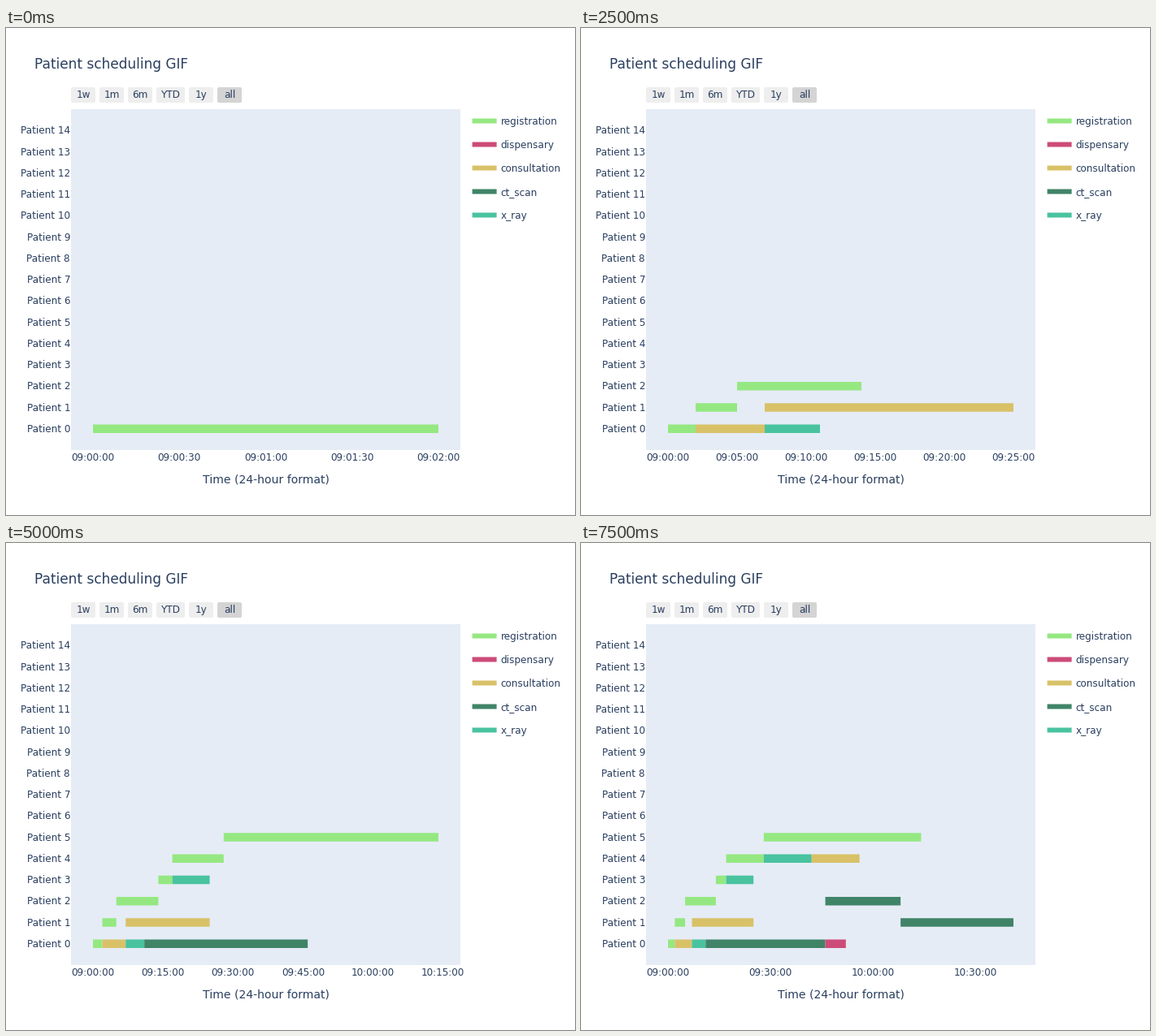
A matplotlib script for the animation above (8000 ms loop, 700 by 600 pixels).

```python
import matplotlib.pyplot as plt
from matplotlib.animation import FuncAnimation
from matplotlib.patches import FancyBboxPatch, Rectangle

W, H, DPI = 700, 600, 100
LEFT, RIGHT, TOP, BOTTOM = 80, 559, 100, 520
X0, X1 = 107, 532          # pixels of the first and last moment
ROW = (BOTTOM - TOP) / 16
INK = "#2a3f5f"

COLORS = {
    "registration": "#95e881",
    "dispensary": "#cd4b78",
    "consultation": "#d9c168",
    "ct_scan": "#408468",
    "x_ray": "#49c39f",
}

# patient, task, start and end in minutes after 09:00, in order of appearance
TASKS = [
    (0, "registration", 0, 2),
    (1, "registration", 2, 5),
    (0, "consultation", 2, 7),
    (2, "registration", 5, 14),
    (1, "consultation", 7, 25),
    (0, "x_ray", 7, 11),
    (0, "ct_scan", 11, 46),
    (3, "registration", 14, 17),
    (4, "registration", 17, 28),
    (3, "x_ray", 17, 25),
    (5, "registration", 28, 74),
    (4, "x_ray", 28, 42),
    (4, "consultation", 42, 56),
    (2, "ct_scan", 46, 68),
    (0, "dispensary", 46, 52),
    (1, "ct_scan", 68, 101),
]
TICK_STEPS = [15, 30, 60, 120, 300, 600, 900, 1800, 3600]

plt.rcParams["font.family"] = "DejaVu Sans"
plt.rcParams["text.hinting"] = "force_autohint"

fig = plt.figure(figsize=(W / DPI, H / DPI), dpi=DPI, facecolor="white")
ax = fig.add_axes([0, 0, 1, 1])
ax.set_xlim(0, W)
ax.set_ylim(H, 0)
ax.axis("off")


def label(x, y, text, size=12, ha="left"):
    return ax.text(x, int(y + 0.5), text, fontsize=size * 72 / DPI, color=INK,
                   ha=ha, va="baseline")


def box(x, y, w, h, color):
    patch = Rectangle((x, y), w, h, facecolor=color, linewidth=0, snap=False)
    return ax.add_patch(patch)


def row_y(patient):
    return BOTTOM - ROW * (patient + 1)


def clock(seconds):
    minutes, s = divmod(seconds, 60)
    return f"{9 + minutes // 60:02d}:{minutes % 60:02d}:{s:02d}"


def draw_buttons():
    x = LEFT
    for name in ("1w", "1m", "6m", "YTD", "1y", "all"):
        w = 35 if name == "YTD" else 30
        color = "#d4d4d4" if name == "all" else "#eeeeee"
        ax.add_patch(FancyBboxPatch(
            (x, 73), w, 19, boxstyle="round,pad=0,rounding_size=2",
            facecolor=color, linewidth=0, snap=False))
        label(x + w / 2, 85.5, name, ha="center")
        x += w + 5


def draw_legend():
    for i, (name, color) in enumerate(COLORS.items()):
        y = 114.5 + 29 * i
        box(573.6, y - 3, 30, 6, color)
        label(608.6, y + 4.7, name)


box(LEFT, TOP, RIGHT - LEFT, BOTTOM - TOP, "#e5ecf6")
label(35, 50, "Patient scheduling GIF", 17)
label((LEFT + RIGHT) / 2, 560.8, "Time (24-hour format)", 14, "center")
for p in range(15):
    label(79, row_y(p) + 4.2, f"Patient {p}", ha="right")
draw_buttons()
draw_legend()

bars = [box(X0, row_y(p) - ROW / 5, 0, ROW * 0.4, COLORS[task])
        for p, task, _, _ in TASKS]
ticks = [label(0, 533, "", ha="center") for _ in range(9)]


def update(frame):
    shown = TASKS[:frame + 1]
    end = max(t[3] for t in shown)
    scale = (X1 - X0) / end

    for i, (bar, (_, _, a, b)) in enumerate(zip(bars, TASKS)):
        bar.set_visible(i <= frame)
        bar.set_x(X0 + a * scale)
        bar.set_width((b - a) * scale)

    # smallest step that keeps labels about 80 px apart
    span = 60 * (RIGHT - LEFT) / scale
    rough = span / ((RIGHT - LEFT) / 80 + 1)
    step = next(s for s in TICK_STEPS if s >= rough)
    for i, tick in enumerate(ticks):
        x = X0 + i * step / 60 * scale
        tick.set_visible(x <= RIGHT)
        tick.set_x(x)
        tick.set_text(clock(i * step))
    return bars + ticks


anim = FuncAnimation(fig, update, frames=len(TASKS), interval=500,
                     repeat=True, repeat_delay=0, blit=False)
plt.show()
```
